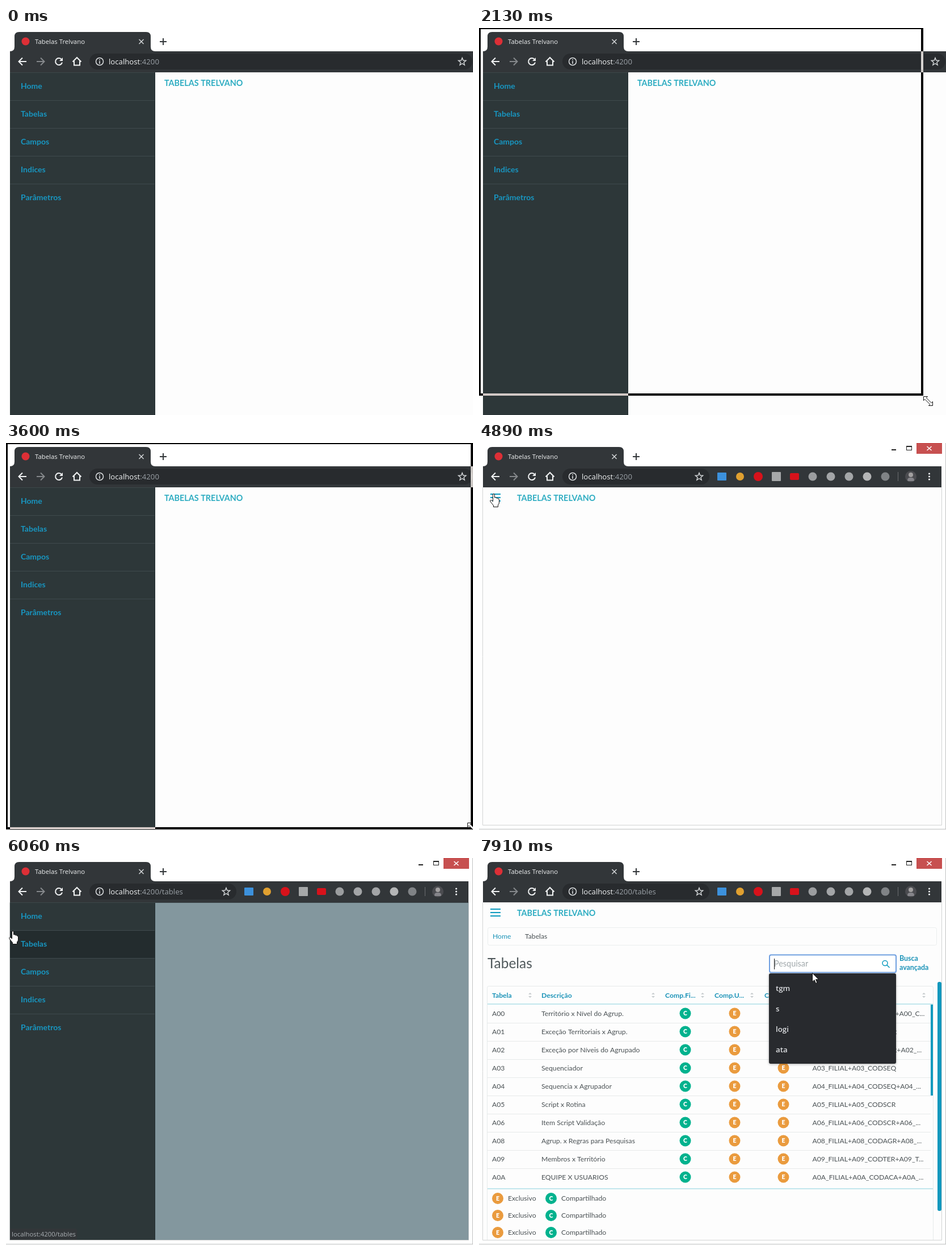
These frames come from a looping animation (823x681 px, 8 s). An HTML page with a canvas:

```html
<!DOCTYPE html>
<html lang="pt">
<head>
<meta charset="utf-8">
<title>Tabelas Trelvano</title>
<style>
  html, body { margin: 0; width: 100%; height: 100%; overflow: hidden; background: #fff; }
  canvas { display: block; }
</style>
</head>
<body>
<canvas id="stage" width="823" height="681"></canvas>
<script>
const ctx = document.getElementById('stage').getContext('2d');
const LOOP = 8000, RELEASE = 3720, LOADED = 6200;
const LINK = '#0c9abe', HEAD = '#1b93b8', INK = '#4a5154', ICON = '#f1f3f4';
const app = (size, weight = 400) => `${weight} ${size}px Lato, sans-serif`;
const ui = (size, weight = 400) => `${weight} ${size}px "Open Sans", sans-serif`;

// Every list holds its value until the next time.
const held = (keys, t) => keys.findLast(k => k[0] <= t);

// time, right, bottom of the resize outline
const outline = [
  [500, 840, 700], [780, 840, 676], [900, 832, 672], [1050, 800, 668], [1170, 772, 664],
  [1320, 779, 664], [1470, 785, 662], [1590, 795, 660], [1710, 802, 655], [1860, 796, 651],
  [1980, 788, 654], [2130, 783, 647], [2250, 787, 653], [2400, 800, 662], [2520, 808, 668],
  [2640, 804, 664], [2790, 812, 672], [2910, 826, 676], [3030, 814, 680], [3180, 820, 680],
  [3330, 817, 677], [3450, 820, 678], [3600, 823, 680]
];
// time, shape, left, top of the pointer
const pointer = [
  [RELEASE, 'resize', 813, 668], [4120, 'arrow', 430, 330], [4240, 'arrow', 144, 67],
  [4380, 'arrow', 112, 72], [4500, 'arrow', 80, 80], [4620, 'arrow', 59, 84],
  [4770, 'hand', 26, 87], [4890, 'hand', 19, 89], [5280, 'hand', 17, 113],
  [5430, 'hand', 13, 118], [5550, 'hand', 10, 122], [5820, 'hand', 7, 126],
  [5940, 'hand', 5, 128], [6200, 'hand', 130, 165], [6320, 'arrow', 390, 230],
  [6440, 'arrow', 580, 266], [6590, 'arrow', 612, 270], [6710, 'arrow', 426, 135],
  [6860, 'arrow', 472, 154], [6980, 'beam', 528, 176], [7100, 'beam', 560, 190],
  [7250, 'arrow', 583, 204], [7400, 'beam', 588, 203], [7910, 'arrow', 587, 202]
];
// time, menu offset, strength of the shade behind it
const menu = [
  [0, 0, 0], [RELEASE, -256, 0], [5040, -176, .25], [5160, -60, .4], [5280, 0, .5],
  [6440, -20, .15], [6590, -87, 0], [6710, -256, 0]
];

function rect(x, y, w, h, fill) {
  ctx.fillStyle = fill;
  ctx.fillRect(x, y, w, h);
}
function round(x, y, w, h, r, fill, line, width = 1) {
  ctx.beginPath();
  ctx.roundRect(x, y, w, h, r);
  if (fill) { ctx.fillStyle = fill; ctx.fill(); }
  if (line) { ctx.strokeStyle = line; ctx.lineWidth = width; ctx.stroke(); }
}
const disc = (x, y, r, fill) => round(x - r, y - r, 2 * r, 2 * r, r, fill);
function text(s, x, y, font, fill, align = 'left') {
  ctx.font = font;
  ctx.fillStyle = fill;
  ctx.textAlign = align;
  ctx.fillText(s, x, y);
}
function path(d, x, y, { fill, line, width = 2 }) {
  const shape = new Path2D(d);
  ctx.save();
  ctx.translate(x, y);
  if (fill) { ctx.fillStyle = fill; ctx.fill(shape); }
  if (line) { ctx.strokeStyle = line; ctx.lineWidth = width; ctx.stroke(shape); }
  ctx.restore();
}

function drawExtensions() {
  round(420, 52, 16, 14, 1, '#3c91dc');
  disc(460, 59, 7, '#e0a030');
  disc(492, 59, 8, '#d8121b');
  round(516, 51, 16, 16, 1, '#a6a8a9');
  round(548, 53, 16, 12, 2, '#d8121b');
  ['#9b9d9f', '#a3a5a7', '#a3a5a7', '#b4b5b6', '#808386']
    .forEach((c, i) => disc(588 + 32 * i, 59, 7.5, c));
  rect(738, 51, 1, 16, '#6a6d70');
  disc(761, 59, 10, '#4b4c50');
  disc(761, 56, 4, '#a2a0a0');
  round(755, 61, 12, 6, [5, 5, 2, 2], '#85858a');
  [54, 59, 64].forEach(y => disc(793.5, y, 1.6, ICON));
}

function drawBrowser(wide, route) {
  const right = wide ? 823 : 815, barEnd = wide ? 822 : 406;
  rect(7, 41, right - 7, 37, '#323639');
  path('M7 41Q15 41 15 33V15Q15 7 23 7H247Q255 7 255 15V33Q255 41 263 41Z', 0, 0, { fill: '#323639' });
  disc(34.5, 23.5, 7, '#dd2f36');
  text('Tabelas Trelvano', 51, 28, ui(11.4), '#eef0f1');
  path('M-4 -4L4 4M4 -4L-4 4', 238.5, 24, { line: '#d5d7d9', width: 1.5 });
  path('M-6 0H6M0 -6V6', 277, 24, { line: '#34383b' });

  path('M7 0H-6M0 -6.5L-6.5 0L0 6.5', 29, 59, { line: ICON });
  path('M-7 0H6M0 -6.5L6.5 0L0 6.5', 61, 59, { line: '#85888b' });
  path('M5 -3.5A6 6 0 1 0 6 1.5', 93, 59, { line: ICON });
  path('M7 -7V-1H1Z', 93, 59, { fill: ICON });
  path('M-7.5 .5L0 -7L7.5 .5M-5 -1V6.5H5V-1', 125, 59, { line: ICON });
  round(147, 45, barEnd - 147, 28, 14, '#282b2e');
  round(158.5, 52.5, 13, 13, 6.5, null, '#dcdfe1', 1.5);
  rect(164.2, 58, 1.6, 5, '#dcdfe1');
  rect(164.2, 55, 1.6, 1.7, '#dcdfe1');
  text('localhost', 181, 64, ui(13.2), ICON);
  const hostEnd = 181 + ctx.measureText('localhost').width;
  text(':4200' + route, hostEnd, 64, ui(13.2), '#9aa0a6');

  const star = Array.from({ length: 10 }, (_, i) => {
    const a = Math.PI * (i / 5 - .5), r = i % 2 ? 3 : 7;
    return `${r * Math.cos(a)} ${r * Math.sin(a)}`;
  });
  path(`M${star.join('L')}Z`, barEnd - 18, 59.5, { line: '#d5d8da', width: 1.4 });
  if (wide) return;

  drawExtensions();
  rect(727, 11, 8, 2, '#222');
  rect(753, 5, 10, 8, '#222');
  rect(754, 7, 8, 5, '#fff');
  rect(771, 0, 45, 19, '#c75050');
  path('M-4 -3.5L4 3.5M4 -3.5L-4 3.5', 793.5, 9.5, { line: '#fff', width: 1.6 });
}

function bullet(letter, x, y) {
  disc(x, y, 10, letter === 'C' ? '#00b28e' : '#ea9b3e');
  text(letter, x, y + 3.7, app(10.5, 900), '#fff', 'center');
}

const rows = [
  ['A00', 'Território x Nível do Agrup.', 'CODTER+A00_C...'],
  ['A01', 'Exceção Territoriais x Agrup.', 'CODAGR'],
  ['A02', 'Exceção por Níveis do Agrupado', 'CODAGR+A02_...'],
  ['A03', 'Sequenciador', 'CODSEQ'],
  ['A04', 'Sequencia x Agrupador', 'CODSEQ+A04_...'],
  ['A05', 'Script x Rotina', 'CODSCR'],
  ['A06', 'Item Script Validação', 'CODSCR+A06_...'],
  ['A08', 'Agrup. x Regras para Pesquisas', 'CODAGR+A08_...'],
  ['A09', 'Membros x Território', 'CODTER+A09_T...'],
  ['A0A', 'EQUIPE X USUARIOS', 'CODACA+A0A_...']
];
const columns = [
  ['Tabela', 23, 90], ['Descrição', 110, 307], ['Comp.Fi...', 328, 394],
  ['Comp.U...', 415, 481], ['Comp.E...', 503, 567], ['Chave Única', 587, 784]
];

function drawTable() {
  round(15.5, 122.5, 791, 31, 3, null, '#ebeeee');
  text('Home', 24, 142, app(12.2), HEAD);
  text('Tabelas', 81, 142, app(12.2), INK);
  text('Tabelas', 15, 194, app(24.4), '#4f585b');
  text('Busca', 741, 181, app(12.4, 700), HEAD);
  text('avançada', 741, 197, app(12.4, 700), HEAD);

  round(14.5, 225.5, 786, 470, 3, null, '#e6eaea');
  for (const [label, x, sortX] of columns) {
    text(label, x, 246, app(12.2, 700), HEAD);
    path('M-3 -1.5L0 -4.5L3 -1.5ZM-3 1.5L0 4.5L3 1.5Z', sortX, 241.5, { fill: '#c6cbcd' });
  }
  rect(15, 256, 785, 2, '#c2e7ed');
  rows.forEach(([code, name, key], i) => {
    const y = 274 + 32 * i;
    if (i) rect(15, y - 16, 781, 1, '#e7eaea');
    text(code, 23, y + 4, app(12.2), INK);
    text(name, 110, y + 4, app(12.2), INK);
    bullet('C', 363.5, y - .5);
    bullet('E', 450.5, y - .5);
    bullet('E', 536.5, y - .5);
    text(`${code}_FILIAL+${code}_${key}`, 587.5, y + 4, app(12.2), INK);
  });
  rect(15, 581, 785, 2, '#c2e7ed');
  rect(796, 258, 4, 160, LINK);
  for (const y of [599, 629, 659]) {
    bullet('E', 33, y);
    text('Exclusivo', 51, y + 4, app(12.2), INK);
    bullet('C', 127, y);
    text('Compartilhado', 145, y + 4, app(12.2), INK);
  }
  round(808, 218, 7, 403, 3, '#1398bd');
}

function drawSearch(t) {
  const focused = t >= 7400;
  round(512, 170.5, 223, 31, 3, '#fff', focused ? '#6f9fe0' : '#b4bbbe', focused ? 2 : 1);
  text('Pesquisar', 520, 191, app(14.4), '#a0a8ab');
  round(711, 180.5, 9, 9, 4.5, null, LINK, 1.5);
  path('M0 0L5 5', 718.5, 188, { line: LINK, width: 1.6 });
  if (focused) rect(520, 177, 1, 19, '#111');
  if (t < 7520) return;
  ctx.save();
  ctx.globalAlpha = t < 7640 ? .6 : 1;
  ctx.shadowColor = 'rgba(0,0,0,.3)';
  ctx.shadowBlur = 4;
  ctx.shadowOffsetY = 1;
  round(511, 203, 224, 159, 3, '#282a2e');
  ctx.shadowColor = 'transparent';
  ['tgm', 's', 'logi', 'ata'].forEach((s, i) => text(s, 523, 234 + 36 * i, ui(13.3, 600), '#dcdee1'));
  ctx.restore();
}

function drawMenu(offset, hover) {
  ctx.save();
  ctx.translate(offset, 0);
  rect(7, 78, 256, 603, '#2d3739');
  rect(7, 78, 256, 1, '#3c474a');
  if (hover) rect(7, 128, 256, 48, '#232c2e');
  ['Home', 'Tabelas', 'Campos', 'Indices', 'Parâmetros'].forEach((s, i) => {
    text(s, 26, 107 + 49 * i, app(14, 700), '#1896c1');
    if (i) rect(7, 78 + 49 * i, 256, 1, '#3f4a4d');
  });
  rect(262, 78, 1, 603, '#253033');
  ctx.restore();
}

function drawPage(t, wide) {
  const [, offset, shade] = held(menu, t);
  ctx.save();
  ctx.beginPath();
  ctx.rect(7, 78, wide ? 816 : 808, wide ? 603 : 594);
  ctx.clip();
  rect(7, 78, 816, 603, '#fdfdfd');
  text('TABELAS TRELVANO', wide ? 279 : 67, 102, app(14.4, 700), '#2fadc2');
  if (!wide) [89, 95, 101].forEach(y => rect(20, y, 18, 2, LINK));
  if (t >= LOADED) { drawTable(); drawSearch(t); }
  rect(7, 78, 816, 603, `rgba(11,51,65,${shade})`);
  if (offset > -256) drawMenu(offset, t >= 5820 && t < 6710);
  if (t >= 5280 && t < LOADED) {
    round(7, 652, 118, 20, [0, 3, 0, 0], '#323639');
    text('localhost:4200' + (t < 5430 ? '' : '/tables'), 10, 666, ui(11.4), '#a9aeb2');
  }
  ctx.restore();
  if (!wide) {
    round(6.5, 78.5, 809, 594, 0, null, '#d2d4d4');
    rect(7, 78, 808, 1, shade ? '#3c474a' : '#f3f4f4');
    rect(822, 0, 1, 680, '#bfc1c1');
    rect(0, 679, 823, 1, '#bfc1c1');
  }
}

function drawOutline(right, bottom) {
  ctx.save();
  ctx.globalCompositeOperation = 'difference';
  rect(0, 0, right, 2, '#fff');
  rect(0, 2, 3, bottom - 2, '#fff');
  rect(right - 4, 2, 4, bottom - 2, '#fff');
  rect(3, bottom - 4, right - 7, 4, '#fff');
  ctx.restore();
}

const pointers = {
  arrow: 'M.5 .5V16L4 12.6L6.6 18.5L9 17.4L6.5 11.8H11.5Z',
  hand: 'M5.5 13V2Q5.5 .5 7 .5T8.5 2V7Q11 5.5 11.5 8Q14 6.8 14.3 9Q16.5 8.5 16.5 11V16Q16.5 18 14.5 20V23.5H6.5V21L1 14Q0 12 2 11.5Q3.5 11.5 5.5 14Z',
  resize: 'M.5 .5H7.5L5.3 2.8L14.2 11.7L16.5 9.5V16.5H9.5L11.7 14.2L2.8 5.3L.5 7.5Z',
  beam: 'M0 .5H3L3.5 1L4 .5H7M3.5 1V16M0 16.5H3L3.5 16L4 16.5H7'
};
function drawPointer(kind, x, y) {
  path(pointers[kind], x, y, { fill: kind !== 'beam' && '#fff', line: '#111', width: 1 });
}

function draw(t) {
  const wide = t < RELEASE;
  rect(0, 0, 823, 681, '#fff');
  drawPage(t, wide);
  drawBrowser(wide, t < 5940 ? '' : '/tables');
  if (!wide) {
    drawPointer(...held(pointer, t).slice(1));
  } else if (t >= 500) {
    const [, right, bottom] = held(outline, t);
    drawOutline(right, bottom);
    drawPointer('resize', Math.min(right, 813), Math.min(bottom + 1, 668));
  }
}

function tick() {
  draw(performance.now() % LOOP);
  requestAnimationFrame(tick);
}
tick();
</script>
</body>
</html>
```
